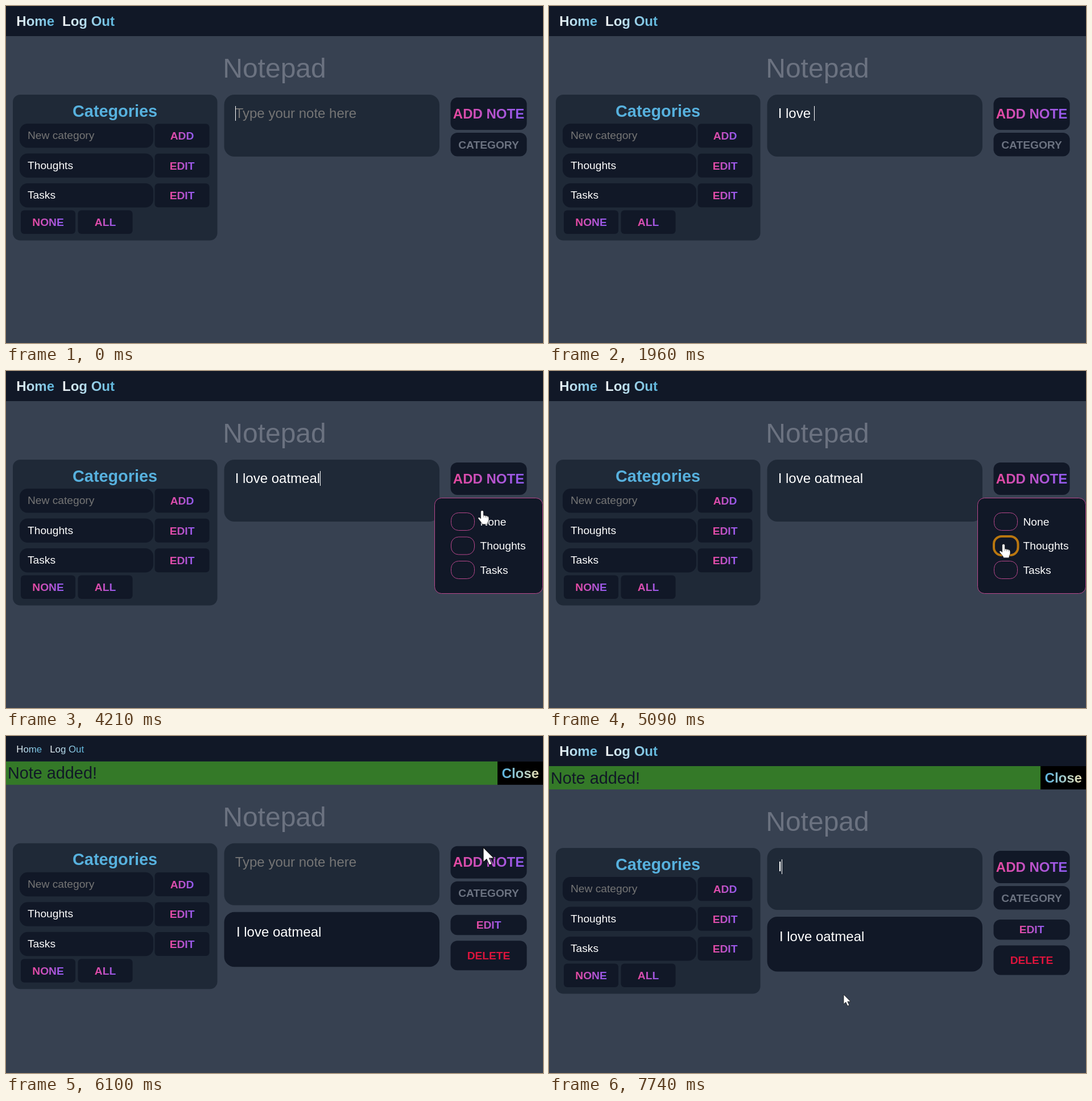
Recreate the animation shown at these times as an HTML page. Size 944x593 px, loop 7990 ms.

```html
<!DOCTYPE html>
<html lang="en">
<head>
<meta charset="utf-8">
<title>Notepad</title>
<style>
  html, body { margin: 0; width: 100%; height: 100%; overflow: hidden; background: #374151; }
  svg { display: block; width: 944px; height: 593px; font: 19.2px "Liberation Sans", Arial, sans-serif; }
  text { white-space: pre; fill: #fff; }
  .bar { fill: #111827; }
  .panel { fill: #1f2937; }
  .bold { font-weight: 700; }
  .mid { text-anchor: middle; }
  .big { font-size: 24px; }
  .glow { fill: url(#glow); }
  .sky { fill: url(#sky); }
  .dim { fill: #6b7280; }
  .hint { fill: #757575; }
  .red { fill: #dc143c; }
  .line { fill: none; stroke: #b8478c; }
  .pointer { fill: #fff; stroke: #111; stroke-width: .7; }
</style>
</head>
<body>
<svg viewBox="0 0 944 593">
  <defs>
    <linearGradient id="glow" x1="-.06" x2="1.06"><stop stop-color="#ec4899"/><stop offset="1" stop-color="#8b5cf6"/></linearGradient>
    <linearGradient id="sky"><stop stop-color="#f0f3f5"/><stop offset="1" stop-color="#5bb5dc"/></linearGradient>
    <linearGradient id="sand"><stop stop-color="#57b1de"/><stop offset="1" stop-color="#e9dfb4"/></linearGradient>
  </defs>

  <rect id="nav" class="bar" width="944" height="53"/>
  <text id="home" class="bold sky" x="18.3">Home</text>
  <text id="logout" class="bold sky">Log Out</text>

  <g id="alert">
    <rect width="864" height="41" fill="#347928"/>
    <rect x="864" width="80" height="41" fill="#000"/>
    <text x="3" y="30.5" font-size="28.8" style="fill:#111827">Note added!</text>
    <text class="bold big mid" x="904.3" y="29" style="fill:url(#sand)">Close</text>
  </g>

  <g id="page">
    <text class="mid dim" x="472" y="126" font-size="48">Notepad</text>
    <rect class="panel" x="12" y="156" width="359.5" height="256.5" rx="13"/>
    <text class="bold mid" x="191.5" y="194.5" font-size="28.8" style="fill:#57b1de">Categories</text>
    <rect class="panel" x="383.5" y="156" width="378.5" height="109" rx="18"/>
    <text id="hint" class="big hint" x="402.7" y="197">Type your note here</text>
    <text id="draft" class="big" x="402.7" y="197"></text>
    <rect id="caret" y="176" width="1" height="26" fill="#fff"/>
    <g id="fields"></g>
    <g id="note">
      <rect class="bar" x="383.5" y="277" width="378.5" height="96.5" rx="18"/>
      <text class="big" x="404.9" y="320">I love oatmeal</text>
    </g>
    <g id="menu">
      <rect class="bar" x="753.5" y="223.5" width="190" height="168" rx="12" style="stroke:#b8478c"/>
      <rect id="ring" x="782" y="291" width="42.5" height="33" rx="13.5" fill="none" stroke="#b9770f" stroke-width="4"/>
    </g>
  </g>

  <path id="arrow" class="pointer" d="M0 0V16.8l3.8-3.5 3 6.7 3-1.3-3-6.4h5.4z"/>
  <g id="hand">
    <path class="pointer" d="M-2.4 1.8a2.4 2.4 0 0 1 4.8 0v6l7 1.5q2.5.6 2.5 3.5v3q0 2-1.5 4l-.8 4h-9.5l-1-2.5-6-7.5q-.8-2 1-2.4 1.5-.2 3.5 2.4z"/>
    <path d="M2.4 8v3.5M5.6 9v3M8.8 9.6v3" fill="none" stroke="#555" stroke-width=".7"/>
  </g>
</svg>
<script>
const LOOP = 7990, TICK = 80, LOADED = 6100, TEXT_X = 402.7;
const NOTE = 'I love oatmeal';
const KEYS = [330, 820, 900, 1060, 1230, 1380, 1960, 2120, 2290, 2450, 2610, 2770, 2850, 3020];
const CARET_ON = [[0, 330], [400, 3590], [4080, 4610], [6750, 7240], [7740, LOOP]];
const HOVER = [[5460, LOADED], [6200, 6420]];

// Pointer journeys: points are [time, x, y]
const PATHS = [
  { end: 4660, pts: [[3660, 690, 387], [3820, 765, 335], [3980, 826, 262], [4180, 837, 246], [4340, 837, 246], [4580, 799, 305]] },
  { end: LOADED, pts: [[4660, 799, 305], [5140, 799, 305], [5300, 808, 270], [5460, 830, 214], [5620, 838, 200], [5780, 837, 195]] },
  { end: 6420, pts: [[6100, 839, 196], [6180, 832, 206], [6260, 796, 216], [6340, 753, 223]] },
  { end: LOOP, pts: [[7080, 522, 390], [7160, 519, 440], [7240, 518, 455]] }
];

const el = Object.fromEntries([...document.querySelectorAll('[id]')].map(e => [e.id, e]));
const pen = document.createElement('canvas').getContext('2d');
pen.font = '24px "Liberation Sans", Arial, sans-serif';

function add(parent, tag, attrs, label) {
  const e = document.createElementNS('http://www.w3.org/2000/svg', tag);
  for (const k in attrs) e.setAttribute(k, attrs[k]);
  if (label) e.textContent = label;
  return parent.appendChild(e);
}

function button(parent, x, y, width, height, rx, label, base, cls) {
  add(parent, 'rect', { class: 'bar', x, y, width, height, rx });
  return add(parent, 'text', { class: 'bold mid ' + cls, x: x + width / 2, y: base }, label);
}

function field(y, label, cls, action) {
  add(el.fields, 'rect', { class: 'bar', x: 24, y, width: 235, height: 42.5, rx: 14 });
  add(el.fields, 'text', { class: cls, x: 38, y: y + 27 }, label);
  button(el.fields, 261.5, y + .2, 96, 42, 6, action, y + 28, 'glow');
}

field(207, 'New category', 'hint', 'ADD');
field(259.5, 'Thoughts', '', 'EDIT');
field(312, 'Tasks', '', 'EDIT');
button(el.fields, 26, 359.5, 96, 41.5, 6, 'NONE', 387, 'glow');
button(el.fields, 126.5, 359.5, 96, 41.5, 6, 'ALL', 387, 'glow');
const addNote = button(el.fields, 781.5, 161, 134, 57, 12, 'ADD NOTE', 197.5, 'big glow');
button(el.fields, 781.5, 223, 134, 41.5, 12, 'CATEGORY', 250.5, 'dim');
button(el.note, 781.5, 282, 134, 35.5, 12, 'EDIT', 306, 'glow');
button(el.note, 781.5, 327.5, 134, 52, 12, 'DELETE', 360, 'red');

['None', 'Thoughts', 'Tasks'].forEach((label, i) => {
  const y = 249.5 + i * 42.5;
  add(el.menu, 'rect', { class: 'line', x: 782.5, y, width: 41, height: 31, rx: 13 });
  add(el.menu, 'text', { x: 833.5, y: y + 22.3 }, label);
});
el.menu.append(el.ring);

const within = (t, spans) => spans.find(([a, b]) => t >= a && t < b);
const show = (e, on) => e.style.display = on ? '' : 'none';
const clamp = v => Math.min(1, Math.max(0, v));
const smooth = v => v * v * (3 - 2 * v);

function place(pts, t) {
  const i = pts.findIndex(p => p[0] > t);
  if (i < 0) return pts[pts.length - 1].slice(1);
  const [a, b] = [pts[i - 1], pts[i]], k = (t - a[0]) / (b[0] - a[0]);
  return [a[1] + (b[1] - a[1]) * k, a[2] + (b[2] - a[2]) * k];
}

function drawPage(t) {
  const loaded = t >= LOADED;
  const grow = loaded ? smooth(clamp((t - 6040) / 300)) : 1;
  const size = 16 + 8 * grow, navH = 53 - (24 - size) * 8 / 7;
  el.nav.setAttribute('height', navH);
  for (const e of [el.home, el.logout]) {
    e.style.fontSize = size + 'px';
    e.style.fontWeight = grow < .5 ? 400 : 700;
    e.setAttribute('y', 35 - (24 - size) * 6 / 7);
  }
  el.logout.setAttribute('x', 18.3 + el.home.getComputedTextLength() + 14);

  show(el.alert, loaded);
  show(el.note, loaded);
  el.alert.setAttribute('transform', `translate(0 ${navH})`);
  el.page.setAttribute('transform', `translate(0 ${navH - 53 + (loaded ? 41 : 0)})`);

  const count = loaded ? +(t >= 7740) : KEYS.filter(k => k <= t).length;
  const text = NOTE.slice(0, count);
  el.draft.textContent = text;
  show(el.hint, !count);
  show(el.caret, within(t, CARET_ON));
  el.caret.setAttribute('x', Math.max(403, Math.floor(TEXT_X + pen.measureText(text).width)));

  show(el.menu, t >= 4050 && t < 5380);
  show(el.ring, t >= 4850);
  const hover = within(t, HOVER);
  addNote.style.opacity = hover ? 1 - .42 * clamp((t - hover[0]) / 150) : 1;
}

function drawPointer(t) {
  const tick = Math.floor((t - 20) / TICK) * TICK + 20;
  const path = PATHS.find(p => tick >= p.pts[0][0] && t < p.end);
  const hand = (tick >= 3980 && tick < LOADED) || (tick >= 6180 && tick < 6340);
  show(el.hand, path && hand);
  show(el.arrow, path && !hand);
  if (!path) return;
  const scale = !hand && tick >= LOADED && tick < 6180 ? 1.55 : 1;
  const [x, y] = place(path.pts, tick);
  (hand ? el.hand : el.arrow).setAttribute('transform', `translate(${x} ${y}) scale(${scale})`);
}

function frame() {
  const t = performance.now() % LOOP;
  drawPage(t);
  drawPointer(t);
  requestAnimationFrame(frame);
}
frame();
</script>
</body>
</html>
```
